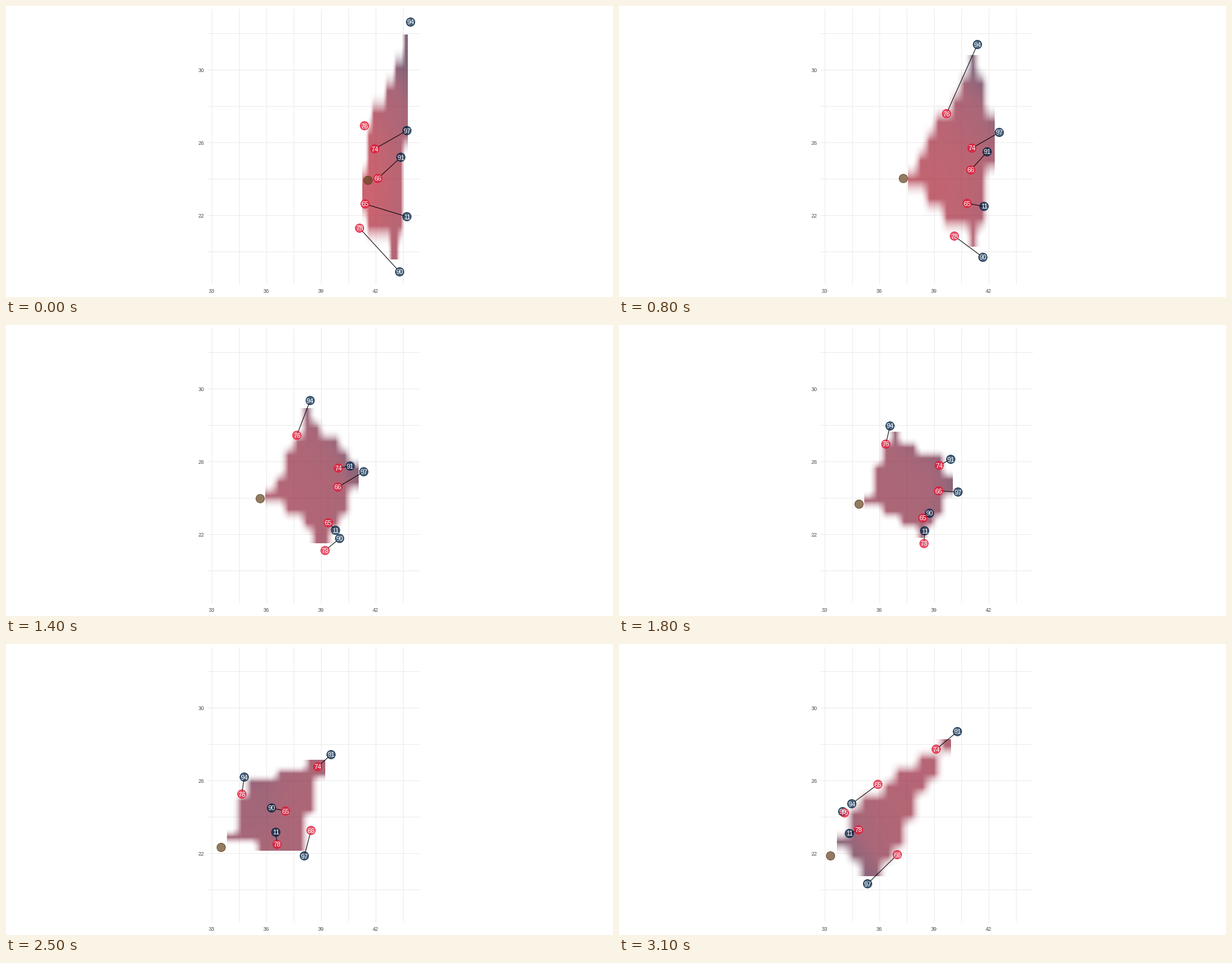
A matplotlib script for the animation above (3700 ms loop, 1000 px wide and 480 px high).

```python
from itertools import permutations

import matplotlib.pyplot as plt
import numpy as np
from matplotlib.animation import FuncAnimation
from matplotlib.patches import Circle

W, H, DPI = 1000, 480, 100
FRAMES, LAST = 37, 31          # the final pose holds to the end of the loop
PX = 72 / DPI                  # one pixel in points
REACH = 150                    # longest link that is drawn
CELLS = 10                     # surface cells per axis

NAVY = (0, 34 / 255, 68 / 255)
RED = (227 / 255, 24 / 255, 55 / 255)
BROWN = (101 / 255, 67 / 255, 33 / 255)

KEYS = np.array([0, 8, 18, 25, LAST], float)


def path(*points):
    """Smooth run through the key points, starting from rest."""
    p = np.array(points, float) + 0.5
    speed = np.gradient(p, KEYS, axis=0, edge_order=2)
    speed[0] = 0
    t = np.arange(LAST + 1)
    k = np.clip(np.searchsorted(KEYS, t, side="right") - 1, 0, len(KEYS) - 2)
    h = (KEYS[k + 1] - KEYS[k])[:, None]
    u = (t - KEYS[k])[:, None] / h
    ease = u * u * (3 - 2 * u)
    return (p[k] + (p[k + 1] - p[k]) * ease
            + h * u * (1 - u) * ((1 - u) * speed[k] - u * speed[k + 1]))


rush = {
    "94": path((666, 26), (590, 63), (446, 166), (392, 219), (383, 263)),
    "97": path((660, 205), (626, 208), (558, 275), (491, 349), (409, 395)),
    "91": path((650, 249), (606, 240), (546, 221), (535, 182), (557, 144)),
    "90": path((648, 438), (599, 414), (511, 310), (437, 270), (368, 276)),
    "11": path((660, 347), (601, 330), (503, 339), (444, 310), (379, 312)),
}
block = {
    "76": path((590, 197), (539, 177), (439, 196), (388, 247), (371, 278)),
    "74": path((607, 235), (581, 234), (527, 231), (513, 202), (522, 173)),
    "66": path((612, 284), (579, 270), (526, 273), (502, 307), (458, 347)),
    "65": path((591, 326), (573, 325), (500, 318), (460, 275), (426, 231)),
    "78": path((582, 366), (552, 379), (502, 360), (446, 330), (394, 306)),
}
ball = path((596, 287), (468, 284), (395, 295), (354, 335), (348, 349))


def inside_hull(x, y, pts):
    """True where the points surround (x, y) with no gap of half a turn."""
    ang = np.sort(np.arctan2(pts[:, 1] - y[..., None], pts[:, 0] - x[..., None]), axis=-1)
    gaps = np.diff(ang, axis=-1, append=ang[..., :1] + 2 * np.pi)
    return gaps.max(axis=-1) < np.pi


def mean_dist(x, y, pts):
    return np.hypot(x[..., None] - pts[:, 0], y[..., None] - pts[:, 1]).mean(axis=-1)


def axis_cells(values):
    """Sample places, pixel centres, linear weights and pixel limits on one axis."""
    nodes = values.min() + np.ptp(values) * (np.arange(CELLS) + 0.5) / CELLS
    first, last = round(nodes[0]), round(nodes[-1])
    pix = np.arange(first, last) + 0.5
    # the cells are squeezed between the outermost sample places
    u = np.clip((pix - first) / (last - first) * CELLS - 0.5, 0, CELLS - 1)
    weights = np.clip(1 - np.abs(u[:, None] - np.arange(CELLS)), 0, 1)
    return nodes, pix, weights, first, last


def tint(lead):
    """Purple where rushers are closer, red where blockers are (lead in pixels)."""
    red = np.interp(lead, [-10, 8, 80], [79, 131, 182])
    green = np.interp(lead, [-10, 8, 80], [34, 38, 32])
    blue = np.interp(lead, [-10, 80], [66, 50])
    return [c / 255 for c in (red, green, blue)]


def surface(blue, red, ball_xy):
    pts = np.vstack([blue, red, ball_xy])
    nx, px, wx, x0, x1 = axis_cells(pts[:, 0])
    ny, py, wy, y0, y1 = axis_cells(pts[:, 1])
    cover = wy @ inside_hull(*np.meshgrid(nx, ny), pts) @ wx.T
    gx, gy = np.meshgrid(px, py)
    lead = mean_dist(gx, gy, blue) - mean_dist(gx, gy, red)
    return np.stack(tint(lead) + [0.7 * cover ** 2], -1), (x0, x1, y1, y0)


def pairing(blue, red):
    """For each blocker, the rusher that keeps the total distance smallest."""
    d = np.hypot(*(red[:, None] - blue[None]).transpose(2, 0, 1))
    rows = np.arange(len(red))
    best = list(min(permutations(rows), key=lambda p: d[rows, list(p)].sum()))
    return best, d[rows, best]


fig = plt.figure(figsize=(W / DPI, H / DPI), dpi=DPI, facecolor="white")
ax = fig.add_axes([0, 0, 1, 1])
ax.set_xlim(0, W)
ax.set_ylim(H, 0)
ax.axis("off")

grid = dict(color="#EBEBEB", lw=PX, solid_capstyle="butt", snap=False, zorder=1)
for gx in range(339, 680, 45):
    ax.plot([gx + 0.5] * 2, [5, 459], **grid)
for gy in range(45, 420, 60):
    ax.plot([332, 682], [gy + 0.5] * 2, **grid)

tick = dict(family="Liberation Sans", size=9 * PX, color="#4D4D4D", va="baseline")
for n in range(4):
    ax.text(339 + 90 * n, 473, str(33 + 3 * n), ha="center", **tick)
for n in range(3):
    ax.text(327, 109 + 120 * n, str(30 - 4 * n), ha="right", **tick)

image = ax.imshow(np.zeros((2, 2, 4)), extent=(0, 1, 1, 0), aspect="auto",
                  interpolation="nearest", zorder=2)
links = [ax.plot([], [], color="black", lw=PX, snap=False, zorder=3)[0] for _ in block]


def disc(color, z):
    return ax.add_patch(Circle((0, 0), 7, fc=(*color, 0.7), ec=(*color, 0.88), lw=PX, zorder=z))


def player(name, track, color, z):
    label = ax.text(0, 0, name, family="Liberation Sans", size=11 * PX, color="white",
                    ha="center", va="baseline", zorder=20)
    return track, disc(color, z), label


players = [player(n, p, NAVY, 6 if n == "11" else 4) for n, p in rush.items()]
players += [player(n, p, RED, 5) for n, p in block.items()]
ball_disc = disc(BROWN, 7)


def draw(i):
    k = min(i, LAST)
    blue = np.array([p[k] for p in rush.values()])
    red = np.array([p[k] for p in block.values()])

    rgba, extent = surface(blue, red, ball[k])
    image.set_data(rgba)
    image.set_extent(extent)

    best, dist = pairing(blue, red)
    for link, r, b, d in zip(links, red, blue[best], dist):
        link.set_data([r[0], b[0]], [r[1], b[1]])
        link.set_visible(d < REACH)

    for track, dot, label in players:
        x, y = track[k]
        dot.center = (x, y)
        label.set_position((x, y + 4))
    ball_disc.center = tuple(ball[k])
    return []


anim = FuncAnimation(fig, draw, frames=FRAMES, interval=100, repeat=True, blit=False)
plt.show()
```
